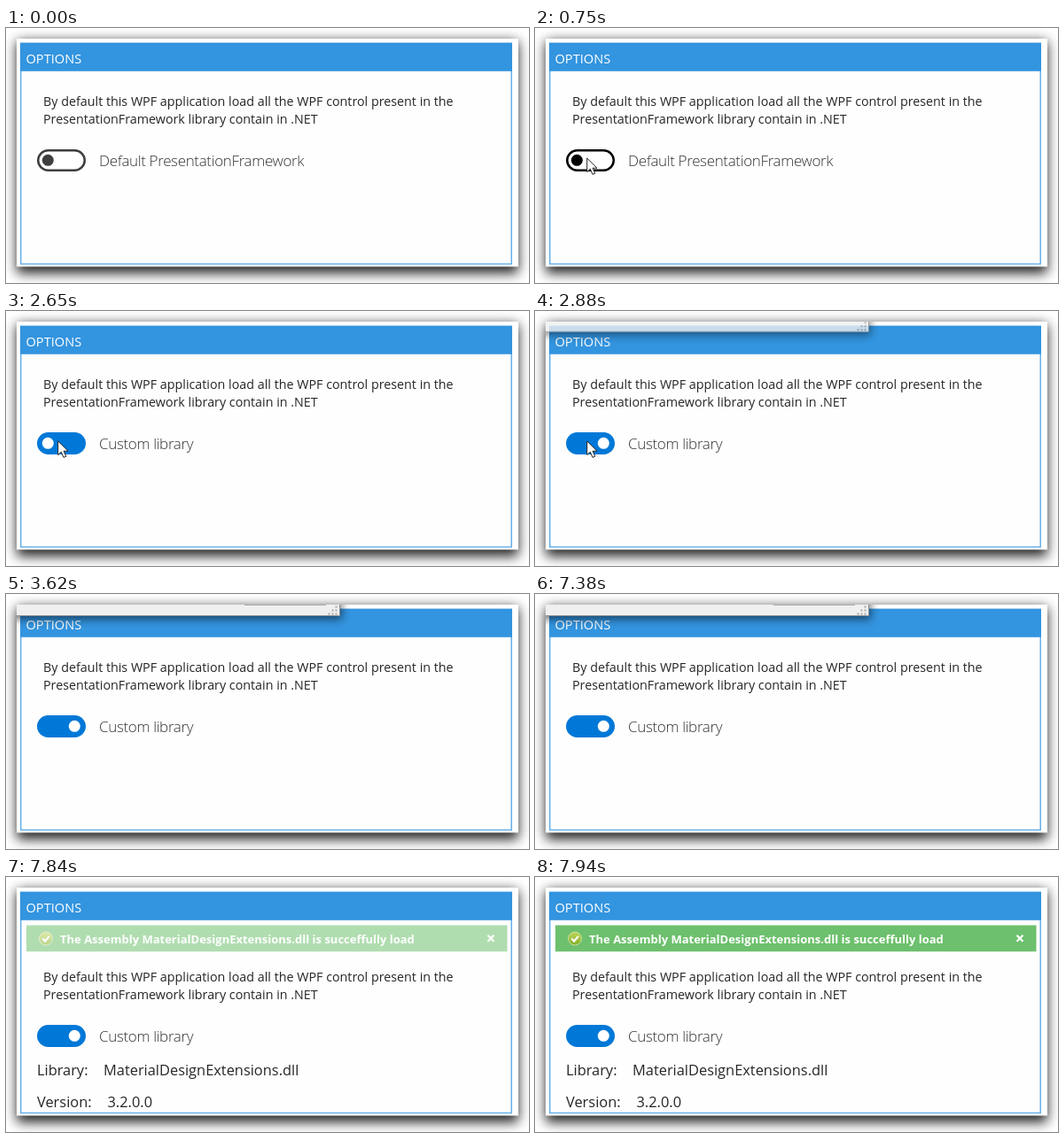
An HTML page for the animation above (7990 ms loop, 590 px wide and 288 px high).

```html
<!DOCTYPE html>
<html lang="en">
<head>
<meta charset="utf-8">
<title>Options panel</title>
<style>
html, body { margin: 0; width: 100%; height: 100%; overflow: hidden; background: #fff; }
svg { display: block; width: 100%; height: 100%; }
text { font-family: "Open Sans", "Noto Sans", sans-serif; fill: #262626; }
.body { font-size: 14.3px; }
.label { font-size: 17px; font-weight: 300; letter-spacing: -.35px; fill: #333; }
.info { font-size: 16.4px; }
.title { font-size: 14.6px; fill: #fff; }
.note { font-size: 13px; font-weight: 700; fill: #fff; }
</style>
</head>
<body>
<svg viewBox="0 0 590 288">
  <defs>
    <filter id="soft" x="-10%" y="-20%" width="120%" height="140%"><feGaussianBlur stdDeviation="7"/></filter>
    <filter id="near" x="-10%" y="-50%" width="120%" height="200%"><feGaussianBlur stdDeviation="5"/></filter>
    <clipPath id="crop"><rect x="12" y="12" width="566" height="257.5"/></clipPath>
    <linearGradient id="badge" x2="0" y2="1">
      <stop stop-color="#c3d75a"/><stop offset="1" stop-color="#7fae2c"/>
    </linearGradient>
  </defs>
  <rect width="590" height="288" fill="#fff"/>
  <rect x="12" y="15" width="566" height="262" rx="3" opacity=".85" filter="url(#soft)"/>
  <g clip-path="url(#crop)">
    <rect x="12" y="12" width="566" height="258" fill="#fff"/>
    <rect x="16.75" y="17.5" width="553.5" height="249" fill="#fefefe" stroke="#66b0e8" stroke-width="1.5"/>
    <rect x="16" y="16.7" width="555" height="32.1" fill="#3394df"/>
    <text class="title" x="22.5" y="40">OPTIONS</text>

    <g id="note">
      <rect x="23" y="54.5" width="542.5" height="29.7" fill="#6dc06d"/>
      <circle cx="45" cy="69.5" r="7.5" fill="url(#badge)" stroke="#c9dfa0"/>
      <path d="M41.3 69.5l2.8 3 4.8-5.6" fill="none" stroke="#fff" stroke-width="2.2"/>
      <text class="note" x="61" y="74.5">The Assembly MaterialDesignExtensions.dll is succeffully load</text>
      <path d="M543.5 65.8l7 7m0-7l-7 7" stroke="#fff" stroke-width="2.2"/>
    </g>

    <g id="content">
      <text class="body" x="42" y="88">By default this WPF application load all the WPF control present in the</text>
      <text class="body" x="42" y="108">PresentationFramework library contain in .NET</text>
      <rect id="track" x="36.25" y="138.25" width="52.5" height="22.5" rx="11.25" stroke-width="2.5"/>
      <circle id="thumb" cy="149.3" r="6.5"/>
      <text id="label" class="label" x="105" y="156"></text>
    </g>

    <g id="info">
      <text class="info" x="35" y="224">Library:</text>
      <text class="info" x="110" y="224">MaterialDesignExtensions.dll</text>
      <text class="info" x="35" y="260">Version:</text>
      <text class="info" x="114.5" y="260">3.2.0.0</text>
    </g>

    <g id="dialog">
      <rect x="-10" y="-40" width="389" height="69" opacity=".5" filter="url(#near)"/>
      <rect x="-10" y="-40" width="386.5" height="65" fill="#f0f0f0"/>
      <path d="M-10 24.5H376.5V-40" fill="none" stroke="#8a8f94"/>
      <path d="M269 12.5H361" stroke="#adadad"/>
      <path id="grip" fill="#a9a9a9"/>
    </g>
    <path id="cursor" d="M0 0V15.6l3.6-3.4 2.7 6.2 2.8-1.2-2.7-6H11.3Z" fill="#fff" stroke="#222" stroke-linejoin="round"/>
  </g>
</svg>
<script>
const LOOP = 7990;
const $ = id => document.getElementById(id);
const el = {};
for (const id of ["note", "content", "track", "thumb", "label", "info", "dialog", "grip", "cursor"]) el[id] = $(id);

const set = (node, attrs) => { for (const k in attrs) node.setAttribute(k, attrs[k]); };
const show = (node, on) => set(node, { visibility: on ? "visible" : "hidden" });
const clamp = v => Math.max(0, Math.min(1, v));
const smooth = v => v * v * (3 - 2 * v);
const lerp = (a, b, p) => a + (b - a) * p;
const mix = (a, b, p) => `rgb(${a.map((v, i) => Math.round(lerp(v, b[i], p)))})`;

// Progress in n held steps, the first at time a and the last at time b.
const steps = (t, a, b, n) =>
  t < a ? 0 : t >= b ? 1 : (Math.floor((t - a) / (b - a) * (n - 1) + .3) + 1) / n;

let dots = "";
for (let r = 0; r < 3; r++)
  for (let c = 2 - r; c < 3; c++) dots += `M${363.5 + c * 4} ${13.5 + r * 4}h2v2h-2z`;
set(el.grip, { d: dots });

const INK = [62, 62, 62], BLACK = [0, 0, 0], GREY = [153, 153, 153], WHITE = [255, 255, 255];

function drawToggle(t) {
  const on = t >= 2560;
  const hover = steps(t, 520, 750, 6), press = steps(t, 2150, 2230, 2);
  const ink = INK.map((v, i) => lerp(v, BLACK[i], hover));
  const slide = smooth(clamp((steps(t, 2560, 2930, 8) - .375) / .5));
  set(el.track, {
    fill: on ? "#0078d7" : mix(WHITE, GREY, press),
    stroke: on ? "#0078d7" : mix(ink, GREY, press)
  });
  set(el.thumb, { cx: lerp(47.3, 77.3, slide), fill: on ? "#fff" : mix(ink, WHITE, press) });
  const name = on ? "Custom library" : "Default PresentationFramework";
  if (el.label.textContent !== name) el.label.textContent = name;
}

function drawDialog(t) {
  const p = t < 7380 ? clamp((steps(t, 2560, 2930, 8) - .375) / .625)
                     : 1 - clamp((t - 7480) / 130);
  set(el.dialog, { opacity: p, transform: `translate(0 ${-6 * (1 - p)})` });
  show(el.dialog, p > 0);
}

function drawCursor(t) {
  const p = smooth(steps(t, 3260, 3620, 9));
  set(el.cursor, { transform: `translate(${lerp(58.7, 47, p)} ${lerp(147, -9, p)})` });
  show(el.cursor, t >= 520 && t < 3620);
}

function draw(t) {
  const done = t >= 7760;
  drawToggle(t);
  drawDialog(t);
  drawCursor(t);
  set(el.content, { transform: `translate(0 ${done ? 30 : 0})` });
  show(el.info, done);
  show(el.note, done);
  set(el.note, { opacity: clamp((t - 7735) / 200) });
}

const start = performance.now();
function tick() {
  draw((performance.now() - start) % LOOP);
  requestAnimationFrame(tick);
}
draw(0);
requestAnimationFrame(tick);
</script>
</body>
</html>
```
